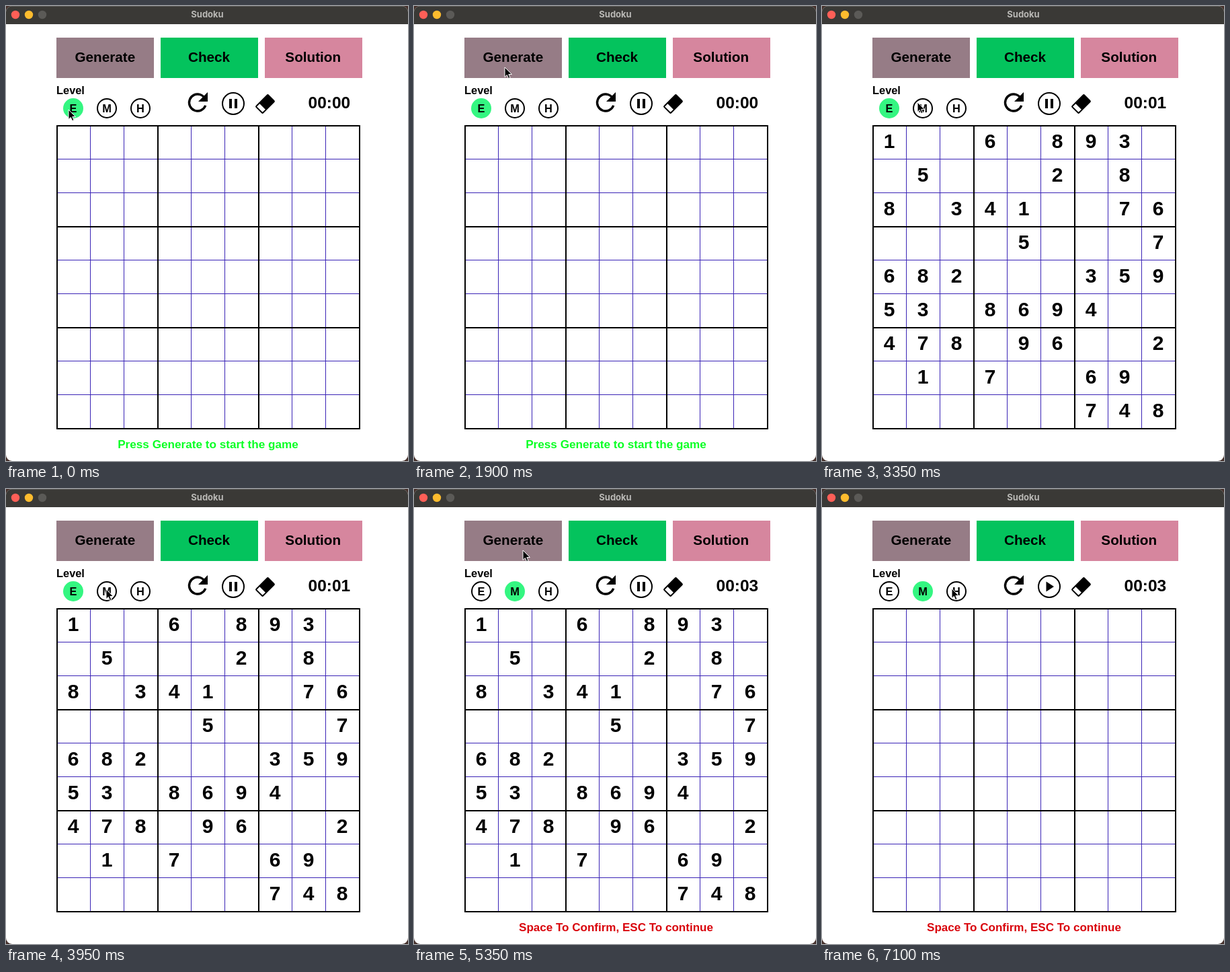
Recreate the animation shown at these times as an HTML page with a canvas. Size 598 px wide and 676 px high, loop 8000 ms.

```html
<!DOCTYPE html>
<html lang="en">
<head>
<meta charset="utf-8">
<title>Sudoku</title>
<style>
  html, body { margin: 0; width: 598px; height: 676px; overflow: hidden; }
  canvas { display: block; }
</style>
</head>
<body>
<canvas id="stage" width="598" height="676"></canvas>
<script>
const ctx = document.getElementById('stage').getContext('2d');
const LOOP = 8000;
const TIMES = { start: 2150, pickMedium: 4200, confirm: 5350, hide: 5700 };

const PUZZLE = [
  '1..6.893.', '.5...2.8.', '8.341..76',
  '....5...7', '682...359', '53.8694..',
  '478.96..2', '.1.7..69.', '......748'
];

// Pointer stops: time, x, y
const POINTER = [
  [0, 93, 154], [50, 93, 154], [500, 119, 122], [850, 133, 98],
  [1200, 135, 91], [2800, 135, 91], [3350, 142, 143], [3600, 145, 148],
  [3950, 149, 149], [4600, 149, 149], [4650, 152, 137], [5150, 162, 91],
  [6050, 162, 91], [6750, 193, 147], [7050, 193, 148], [LOOP, 193, 148]
];

function pointerAt(t) {
  const i = POINTER.findIndex(stop => stop[0] > t);
  const [t0, x0, y0] = POINTER[i - 1], [t1, x1, y1] = POINTER[i];
  const k = (t - t0) / (t1 - t0);
  return [x0 + (x1 - x0) * k, y0 + (y1 - y0) * k];
}

function text(str, x, y, size, color = '#000', align = 'center') {
  ctx.font = `bold ${size}px "Liberation Sans", Arial, sans-serif`;
  ctx.textAlign = align;
  ctx.fillStyle = color;
  ctx.fillText(str, x, y);
}

function rect(x, y, w, h, color) {
  ctx.fillStyle = color;
  ctx.fillRect(x, y, w, h);
}

function disc(x, y, r, color) {
  ctx.beginPath();
  ctx.arc(x, y, r, 0, Math.PI * 2);
  ctx.fillStyle = color;
  ctx.fill();
}

function ring(x, y, r, width, from = 0, to = Math.PI * 2) {
  ctx.beginPath();
  ctx.arc(x, y, r, from, to);
  ctx.strokeStyle = '#000';
  ctx.lineWidth = width;
  ctx.stroke();
}

function polygon(points, color) {
  ctx.beginPath();
  points.forEach(p => ctx.lineTo(...p));
  ctx.closePath();
  ctx.fillStyle = color;
  ctx.fill();
}

function drawWindow() {
  rect(0, 0, 598, 676, '#45302b');
  ctx.beginPath();
  ctx.roundRect(0, 0, 598, 676, 9);
  ctx.fillStyle = '#fff';
  ctx.fill();
  ctx.beginPath();
  ctx.roundRect(0, 0, 598, 27, [9, 9, 0, 0]);
  ctx.fillStyle = '#3a3936';
  ctx.fill();
  rect(8, 0, 582, 1, '#5c5b58');
  ['#ff5f57', '#febc2e', '#5b5a57'].forEach((c, i) => disc(14 + 20 * i, 13, 6.2, c));
  ctx.font = 'bold 13px Inter, sans-serif';
  ctx.textAlign = 'center';
  ctx.fillStyle = '#b9b8b5';
  ctx.fillText('Sudoku', 299.5, 17);
}

function drawButtons() {
  const buttons = [['Generate', '#967c86'], ['Check', '#04c35d'], ['Solution', '#d6869e']];
  buttons.forEach(([label, color], i) => {
    rect(75 + 155 * i, 47, 145, 60, color);
    text(label, 147.3 + 154.7 * i, 83, 20.7);
  });
}

function drawLevels(selected) {
  text('Level', 75, 131, 16.4, '#000', 'left');
  [...'EMH'].forEach((level, i) => {
    const x = 100 + 50 * i;
    if (level === selected) disc(x, 152, 15, '#34f681');
    else ring(x, 152, 14, 2);
    text(level, x, 158, 16.4);
  });
}

function drawIcons(paused) {
  ring(285, 143.5, 12.5, 3.4, 0.35, Math.PI * 1.78);
  polygon([[300, 128], [300, 142], [286, 142]], '#000');

  ring(338, 145, 16, 2);
  if (paused) {
    polygon([[333.5, 137.5], [345, 145], [333.5, 152.5]], '#000');
  } else {
    rect(332, 138, 4, 14, '#000');
    rect(340, 138, 4, 14, '#000');
  }

  ctx.save();
  ctx.translate(385.5, 145.5);
  ctx.rotate(-Math.PI / 4);
  ctx.beginPath();
  ctx.roundRect(-13.5, -8, 27, 16, 2);
  ctx.fillStyle = '#000';
  ctx.fill();
  rect(-11.5, -6, 6, 12, '#fff');
  ctx.restore();
}

function drawGrid() {
  for (const thick of [false, true]) {
    for (let i = 0; i <= 9; i++) {
      if ((i % 3 === 0) !== thick) continue;
      const p = 50 * i, width = thick ? 2 : 1, color = thick ? '#000' : '#3a24b6';
      rect(75 + p, 177, width, 452, color);
      rect(75, 177 + p, 452, width, color);
    }
  }
}

function drawDigits() {
  PUZZLE.forEach((row, r) => [...row].forEach((digit, c) => {
    if (digit !== '.') text(digit, 100 + 50 * c, 211 + 50 * r, 30);
  }));
}

function drawPointer(x, y) {
  ctx.save();
  ctx.translate(x, y);
  ctx.lineJoin = 'round';
  polygon([[0, 0], [0, 14.5], [3.3, 11.4], [5.6, 16.6], [8, 15.6], [5.8, 10.5], [10.4, 10.5]], '#000');
  ctx.strokeStyle = '#fff';
  ctx.lineWidth = 1;
  ctx.stroke();
  ctx.restore();
}

function draw(t) {
  const hidden = t >= TIMES.hide;
  const seconds = Math.min(3, Math.max(0, Math.floor((t - TIMES.start) / 1000)));
  drawWindow();
  drawButtons();
  drawLevels(t < TIMES.pickMedium ? 'E' : 'M');
  drawIcons(hidden);
  text('00:0' + seconds, 449.5, 152, 24.5, '#000', 'left');
  if (t >= TIMES.start && !hidden) drawDigits();
  drawGrid();
  if (t < TIMES.start) text('Press Generate to start the game', 300.5, 657, 17.15, '#0aff24');
  if (t >= TIMES.confirm) text('Space To Confirm, ESC To continue', 300.5, 657, 17.05, '#d9040c');
  drawPointer(...pointerAt(t));
}

function tick() {
  draw(performance.now() % LOOP);
  requestAnimationFrame(tick);
}
tick();
</script>
</body>
</html>
```
